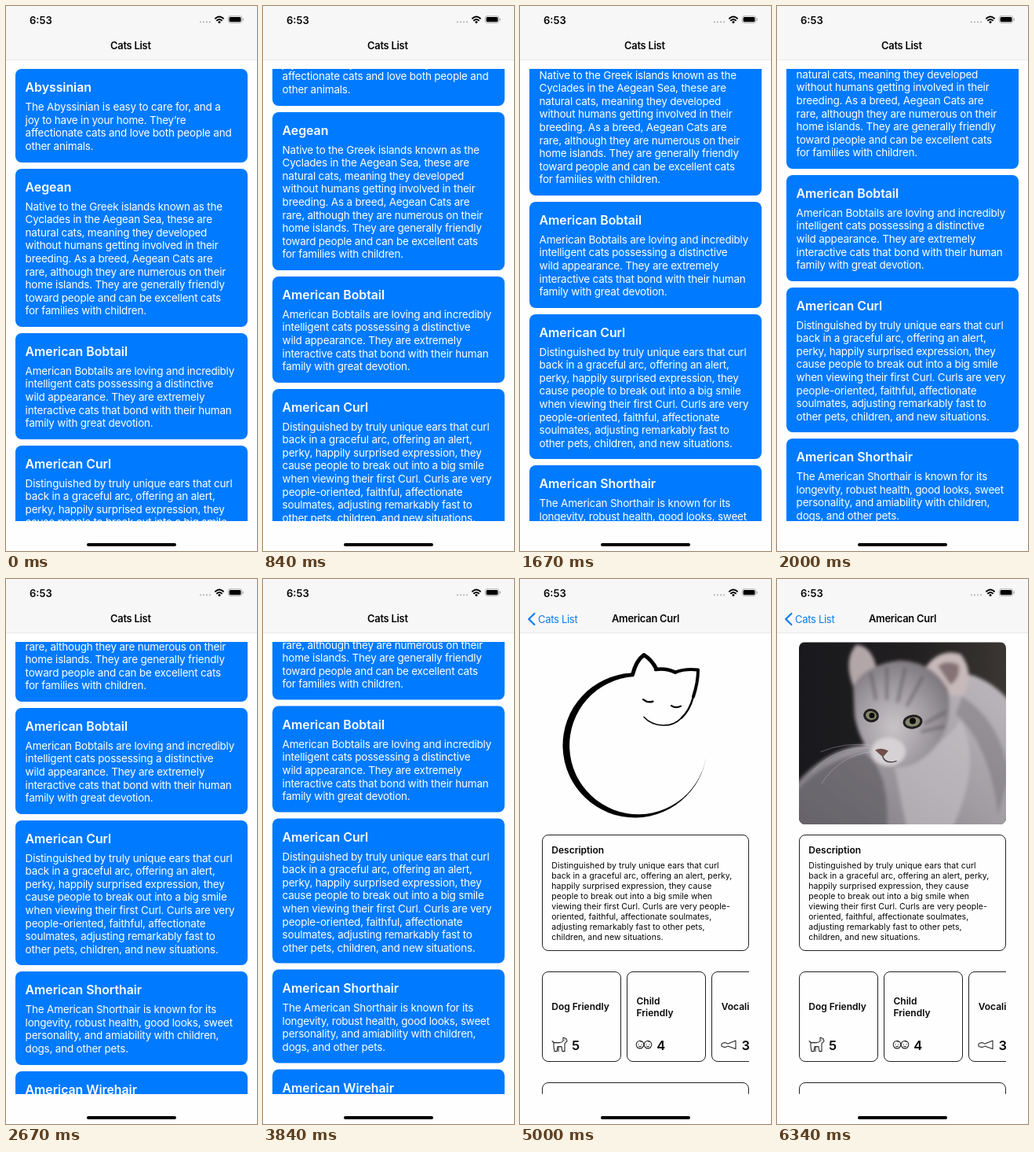
Recreate the animation shown at these times as an HTML page. Size 320 px wide and 693 px high, loop 8 s.

```html
<!DOCTYPE html>
<html lang="en">
<head>
<meta charset="utf-8">
<title>Cats List</title>
<style>
  html, body { margin: 0; width: 100%; height: 100%; overflow: hidden; background: #fefefe; }
  body { position: relative; font-family: Inter, "Liberation Sans", sans-serif; color: #060606; }
  div, span, svg { position: absolute; box-sizing: border-box; }
  span, svg { left: 0; top: 0; }
  #stage { left: 0; top: 0; width: 320px; height: 693px; overflow: hidden; background: #fefefe; }

  .page { left: 0; top: 69px; width: 320px; height: 624px; overflow: hidden; background: #fefefe; }
  .scroller { left: 0; top: 11.4px; width: 320px; height: 574.4px; overflow: hidden; }
  .scroller div { white-space: pre; }
  #cards { left: 12px; top: 0; width: 296px; }
  .card { position: relative; margin-bottom: 8.2px; padding: 12px 12.6px; border-radius: 8px; background: #007aff; color: #fff; }
  .card div { position: static; }
  .card .name { margin-bottom: 5px; font: 600 15.9px/23px Inter, sans-serif; letter-spacing: -.05px; }
  .card .text { font-size: 13.5px; line-height: 16.55px; letter-spacing: -.21px; }
  #dim { inset: 0; background: #000; opacity: 0; }

  .box { border: 1px solid #222; border-radius: 8px; }
  .head { font-weight: 600; font-size: 12px; line-height: 14.6px; }
  #about { font-size: 10.5px; line-height: 12.87px; letter-spacing: .02px; }
  .score { font-weight: 600; font-size: 16.5px; line-height: 20px; }

  #bar { left: 0; top: 0; width: 320px; height: 69px; background: #f7f7f7; border-bottom: 1px solid #e9e9ea; }
  #bar span { top: 42px; line-height: 18px; white-space: nowrap; }
  .title { font-weight: 600; font-size: 12.9px; letter-spacing: -.25px; }
  #back { color: #0a7cf0; font-size: 13px; letter-spacing: -.3px; }
  #bar #next { left: 160px; }
  #bar .clock { left: 30px; top: 9px; font-weight: 600; font-size: 13px; }
  #home { left: 103px; top: 682.6px; width: 114px; height: 4.2px; border-radius: 3px; background: #000; }
</style>
</head>
<body>
<div id="stage">
  <div class="page" id="list">
    <div class="scroller"><div id="cards"></div></div>
    <div id="dim"></div>
  </div>

  <div class="page" id="detail">
    <div class="scroller" id="content">
      <svg width="320" height="575" viewBox="0 80.4 320 575" fill="none" stroke-linecap="round" stroke-linejoin="round">
        <defs>
          <clipPath id="frame"><rect x="28" y="80.4" width="264" height="232" rx="8"/></clipPath>
          <linearGradient id="backdrop" x1="0" x2="1"><stop stop-color="#19191d"/><stop offset=".55" stop-color="#211f20"/><stop offset="1" stop-color="#3b3633"/></linearGradient>
          <linearGradient id="fur" x1="0" x2="1" y1="1" y2="0"><stop stop-color="#77737a"/><stop offset=".5" stop-color="#a09ca2"/><stop offset="1" stop-color="#bfbabf"/></linearGradient>
          <radialGradient id="face" cx=".42" cy=".62" r=".68"><stop stop-color="#c9c4c8"/><stop offset=".55" stop-color="#a09ba0"/><stop offset="1" stop-color="#79747a"/></radialGradient>
          <filter id="soft" x="-20%" y="-20%" width="140%" height="140%"><feGaussianBlur stdDeviation="2.2"/></filter>
        </defs>

        <g id="sketch" stroke="#000" transform="translate(-40)">
          <path fill="#000" stroke="none" d="M278.500 212A92 92 0 1 1 182 120L185 124.400A87.700 87.700 0 1 0 278.500 212Z"/>
          <path stroke-width="5" d="M183.500 122Q188 104 198 97Q208 103 214 115"/>
          <path stroke-width="4.500" d="M213 115.500Q226 113.500 238 119"/>
          <path stroke-width="4" d="M238 119Q251 114 267 116Q267 132 261 150"/>
          <path stroke-width="2.400" d="M261 150Q256 168 246 177"/>
          <path stroke-width="1.500" d="M246 177Q236 187 222 186.500Q207 186 198 176"/>
          <path stroke-width="2.200" d="M197 153.500Q203 158.500 209.500 156M233 161.500Q239 165.500 245 162"/>
        </g>

        <g id="photo" clip-path="url(#frame)">
          <path fill="url(#backdrop)" d="M28 80h264v233H28z"/>
          <g filter="url(#soft)">
            <path fill="url(#fur)" d="M20 266Q60 217 112 211L218 118Q266 118 300 160V325H20Z"/>
            <path fill="#5d5960" d="M20 276Q58 229 112 222Q145 244 140 325H20Z" opacity=".65"/>
            <path fill="#cbc6ca" d="M150 240Q205 220 235 180Q262 236 222 320H166Z" opacity=".55"/>
            <path fill="#5d5960" d="M236 150Q285 180 296 250L282 300Q270 210 228 172Z" opacity=".35"/>
            <path fill="#b3a6a8" d="M97 137Q84 103 101 84Q123 86 128 120Z"/>
            <path fill="#c7b9ba" d="M190 112Q208 88 234 96Q252 118 239 147Q220 154 203 134Z"/>
            <path fill="#857276" d="M205 111Q217 102 232 110Q234 127 221 135Z"/>
            <path fill="url(#face)" d="M97 137Q112 109 157 104Q199 106 218 141Q227 193 192 224Q163 249 132 235Q107 215 99 176Z"/>
            <path stroke="#5a555b" stroke-width="4" opacity=".6" d="M120 121L126 153M140 115L140 153M163 115L154 156M185 126L166 161M189 184L214 170M185 194L213 188"/>
            <ellipse cx="142" cy="220" rx="22" ry="18" fill="#d6d1d4"/>
          </g>
          <g stroke="#211f20" stroke-width="3" fill="#85866a">
            <ellipse cx="120" cy="174" rx="8.500" ry="7" transform="rotate(12 120 174)"/>
            <ellipse cx="173" cy="182" rx="11" ry="7.500" transform="rotate(-8 173 182)"/>
          </g>
          <circle cx="121" cy="174" r="3.500" fill="#0c0c0d"/><circle cx="173" cy="181" r="4" fill="#0c0c0d"/>
          <path fill="#704f4c" d="M125 218Q133 214 142 219L135 227Z"/>
          <path stroke="#474045" stroke-width="1.500" d="M135 227Q139 236 152 232"/>
          <path stroke="#d4cfd4" stroke-width=".6" opacity=".6" d="M118 215Q72 214 46 245M120 220Q80 225 57 260M121 212Q88 207 56 220"/>
        </g>

        <g stroke="#262626" stroke-width="1.100">
          <path d="M41 588L43 590V595L44 601H47L48 595H53L54 601H57L57 591L60 588L59 585L55 583.500V588Q53 590 50 590H44Z"/>
          <path d="M57 586.500h.2M49 595V601"/>
          <g id="babies">
            <circle cx="153" cy="592.500" r="4.800"/><circle cx="163" cy="592.500" r="4.800"/>
            <path d="M151 592h.1M155 592h.1M161 592h.1M165 592h.1M151.500 594.500q1.500 1.300 3 0M161.500 594.500q1.500 1.300 3 0M153 587.700q1 1.500 2 .5M163 587.700q1 1.500 2 .5"/>
          </g>
          <path d="M257 591.500Q261 588.500 265 591.500L275 587.500V598L265 594.500Q261 597 257 594.500Z"/>
        </g>
      </svg>
    </div>
  </div>

  <div id="bar">
    <span class="clock">6:53</span>
    <span class="title" id="old">Cats List</span>
    <span id="back">Cats List</span>
    <span class="title" id="next">American Curl</span>
    <svg width="320" height="69" fill="none" stroke-linecap="round">
      <path id="arrow" d="M18.400 44L11.200 51L18.400 58" stroke="#0a7cf0" stroke-width="2.200" stroke-linejoin="round"/>
      <path d="M248 20.300H261" stroke="#b6b6b8" stroke-width="2.200" stroke-dasharray="0 4"/>
      <path d="M267 15.800Q272 11.300 277 15.800M269 18.300Q272 15.500 275 18.300" stroke="#000" stroke-width="1.900"/>
      <circle cx="272" cy="20.600" r="1.500" fill="#000"/>
      <rect x="283.300" y="12.700" width="17.500" height="8.800" rx="2.600" stroke="#a5a5a7" stroke-width=".8"/>
      <rect x="284.600" y="14" width="14.900" height="6.200" rx="1.500" fill="#000"/>
      <path d="M302.200 16V18.300" stroke="#a5a5a7" stroke-width="1.200"/>
    </svg>
  </div>
  <div id="home"></div>
</div>

<script>
const $ = id => document.getElementById(id);
const LOOP = 8000;
const PUSH = 4050;
const PHOTO = 6340;

const cats = [
  ['Abyssinian', `The Abyssinian is easy to care for, and a
joy to have in your home. They’re
affectionate cats and love both people and
other animals.`],
  ['Aegean', `Native to the Greek islands known as the
Cyclades in the Aegean Sea, these are
natural cats, meaning they developed
without humans getting involved in their
breeding. As a breed, Aegean Cats are
rare, although they are numerous on their
home islands. They are generally friendly
toward people and can be excellent cats
for families with children.`],
  ['American Bobtail', `American Bobtails are loving and incredibly
intelligent cats possessing a distinctive
wild appearance. They are extremely
interactive cats that bond with their human
family with great devotion.`],
  ['American Curl', `Distinguished by truly unique ears that curl
back in a graceful arc, offering an alert,
perky, happily surprised expression, they
cause people to break out into a big smile
when viewing their first Curl. Curls are very
people-oriented, faithful, affectionate
soulmates, adjusting remarkably fast to
other pets, children, and new situations.`],
  ['American Shorthair', `The American Shorthair is known for its
longevity, robust health, good looks, sweet
personality, and amiability with children,
dogs, and other pets.`],
  ['American Wirehair', ' ']
];

const about = `Distinguished by truly unique ears that curl
back in a graceful arc, offering an alert, perky,
happily surprised expression, they cause
people to break out into a big smile when
viewing their first Curl. Curls are very people-
oriented, faithful, affectionate soulmates,
adjusting remarkably fast to other pets,
children, and new situations.`;

function add(parent, cls, text = '', style = {}) {
  const el = document.createElement('div');
  el.className = cls;
  el.textContent = text;
  for (const k in style) el.style[k] = style[k] + 'px';
  return parent.appendChild(el);
}

for (const [name, text] of cats) {
  const card = add($('cards'), 'card');
  add(card, 'name', name);
  add(card, 'text', text);
}

// Detail content uses stage coordinates, shifted to the scroller's top.
const TOP = 80.4;
const content = $('content');
content.style.clipPath = 'inset(0 28px 0 0)';
const place = (cls, text, left, y, size = {}) =>
  add(content, cls, text, { left, top: y - TOP, ...size });

place('box', '', 28, 325, { width: 264, height: 148.5 });
place('head', 'Description', 40.3, 337.7);
place('', about, 40.3, 359.4).id = 'about';
[['Dog Friendly', 5], ['Child\nFriendly', 4], ['Vocalisation', 3]].forEach(([label, score], i) => {
  const x = 28 + i * 108.2;
  const lines = label.split('\n').length;
  place('box', '', x, 499, { width: 100.5, height: 115.5 });
  place('head', label, x + 12.3, 544.7 - lines * 7.3);
  place('score', score, x + 38, 583);
});
place('box', '', 28, 640, { width: 264, height: 60 });

// The screen refreshes only at these moments.
const beats = [0, 500, 670, 840, 1170, 1340, 1500, 1670, 1840, 2000, 2340, 2500,
  2670, 3840, 4000, 4170, 4340, 4500, 5000, 6340];
const drag = [[0, 0], [400, 0], [840, 72], [1170, 96], [1340, 124], [1670, 167],
  [2000, 201], [2340, 231], [2670, 252], [3670, 252], [3840, 254.5]];

const clamp = v => Math.max(0, Math.min(1, v));
const hold = t => beats.filter(b => b <= t).pop();

function scrollAt(t) {
  const i = drag.findIndex(k => k[0] > t);
  if (i < 0) return drag[drag.length - 1][1];
  const [[t0, y0], [t1, y1]] = [drag[i - 1], drag[i]];
  return y0 + (y1 - y0) * (t - t0) / (t1 - t0);
}

// Critically damped spring, as in a navigation push.
function pushAt(t) {
  const x = Math.max(0, t - PUSH) * 0.0124;
  return 1 - (1 + x) * Math.exp(-x);
}

function draw(t) {
  const p = pushAt(t);
  const move = (id, x, y = 0) => { $(id).style.transform = `translate(${x}px, ${y}px)`; };
  const fade = (id, v) => { $(id).style.opacity = clamp(v); };

  move('cards', 0, -scrollAt(t));
  move('list', -96 * p);
  move('detail', Math.round(320 * (1 - p)));
  fade('dim', p * 0.11);

  const labelX = 23 + 110 * (1 - p) ** 0.93;
  move('old', labelX);
  move('back', labelX);
  fade('old', 1 - 2.2 * p);
  fade('back', 2.2 * p - 0.2);
  fade('arrow', (t - 3950) / 300);
  $('next').style.transform = `translateX(calc(-50% + ${160 * (1 - p)}px))`;
  fade('next', (p - 0.88) / 0.1);

  const loaded = t >= PHOTO;
  $('photo').style.display = loaded ? '' : 'none';
  $('sketch').style.display = loaded ? 'none' : '';
}

const start = performance.now();
function tick() {
  draw(hold((performance.now() - start) % LOOP));
  requestAnimationFrame(tick);
}
tick();
</script>
</body>
</html>
```
